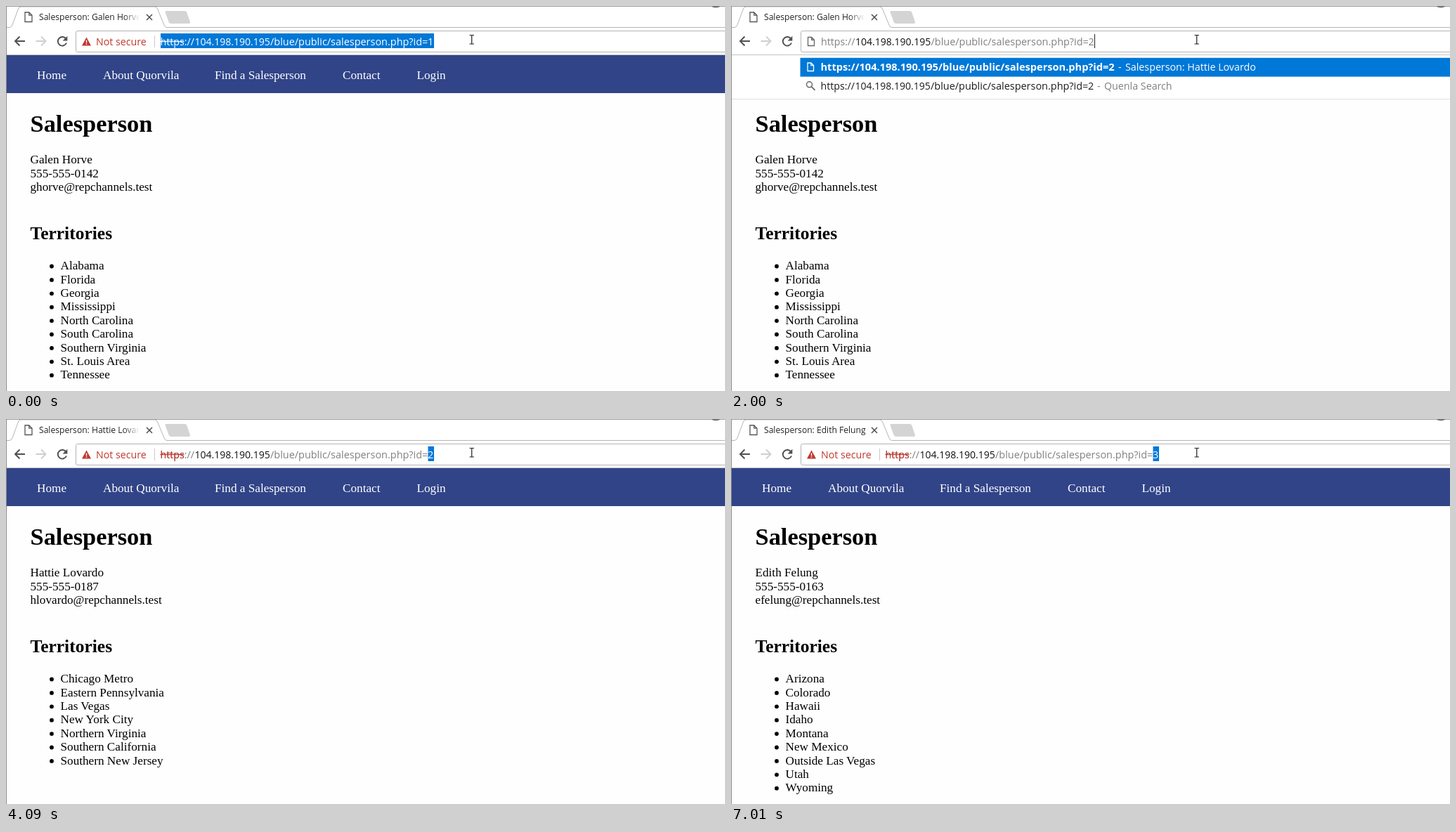
These frames come from a looping animation (1023 by 548 pixels, 8 s). An HTML page:

```html
<!DOCTYPE html>
<html lang="en">
<head>
<meta charset="utf-8">
<title>Salesperson</title>
<style>
html, body { margin: 0; width: 100%; height: 100%; overflow: hidden; background: #fff; }
svg { display: block; width: 1023px; height: 548px; }
.ui { font-family: "Open Sans", "Noto Sans", sans-serif; }
.page { font-family: "Liberation Serif", "Times New Roman", serif; }
</style>
</head>
<body>
<svg id="stage" viewBox="0 0 1023 548" xmlns="http://www.w3.org/2000/svg"></svg>
<script>
const LOOP = 8000;
const BLUE = '#0078d7', LINK = '#2956c8', RED = '#c0372b', GREY = '#808080', INK = '#1c1c1c';

const people = [
  { name: 'Galen Horve', phone: '555-555-0142', mail: 'ghorve', fade: true,
    areas: ['Alabama', 'Florida', 'Georgia', 'Mississippi', 'North Carolina', 'South Carolina',
      'Southern Virginia', 'St. Louis Area', 'Tennessee'] },
  { name: 'Hattie Lovardo', phone: '555-555-0187', mail: 'hlovardo', fade: true,
    areas: ['Chicago Metro', 'Eastern Pennsylvania', 'Las Vegas', 'New York City',
      'Northern Virginia', 'Southern California', 'Southern New Jersey'] },
  { name: 'Edith Felung', phone: '555-555-0163', mail: 'efelung', fade: false,
    areas: ['Arizona', 'Colorado', 'Hawaii', 'Idaho', 'Montana', 'New Mexico',
      'Outside Las Vegas', 'Utah', 'Wyoming'] }
];

// start time and look of the browser from then on
const steps = [
  [0,    { who: 0, id: '1', select: 'all' }],
  [420,  { who: 0, id: '1', caret: true }],
  [1010, { who: 0, id: '1' }],
  [1420, { who: 0, id: '', edit: true, caret: true, drop: 'long' }],
  [1850, { who: 0, id: '2', edit: true, caret: true, drop: 'short' }],
  [2000, { who: 0, id: '2', edit: true, caret: true, drop: 'short', edge: true }],
  [2140, { who: 0, id: '2', edit: true, caret: true }],
  [2260, { who: 0, id: '2', edit: true, caret: true, spin: 200 }],
  [2390, { who: 0, id: '2', edit: true, caret: true, spin: 80 }],
  [2540, { who: 1, id: '2', shift: -6 }],
  [2690, { who: 1, id: '2' }],
  [3970, { who: 1, id: '2', select: 'all' }],
  [4090, { who: 1, id: '2', select: 'digit' }],
  [4990, { who: 1, id: '3', edit: true, caret: true, drop: 'short', edge: true }],
  [5150, { who: 2, id: '3', edit: true }],
  [5300, { who: 2, id: '3' }],
  [7010, { who: 2, id: '3', select: 'digit' }]
];

const HOST = '104.198.190.195', PATH = '/blue/public/salesperson.php?id=';
const title = i => 'Salesperson: ' + people[i].name;

const text = (x, y, s, fill, size, extra = '') =>
  `<text x="${x}" y="${y}" fill="${fill}" font-size="${size}" ${extra}>${s}</text>`;
const rect = (x, y, w, h, fill) =>
  `<rect x="${x}" y="${y}" width="${w}" height="${h}" fill="${fill}"/>`;
const line = (d, color, width = 1) =>
  `<path d="${d}" fill="none" stroke="${color}" stroke-width="${width}"/>`;

function doc(x, y, w, h, color) {
  const f = w * 0.42;
  return line(`M${x} ${y}h${w - f}l${f} ${f}v${h - f}h${-w}z M${x + w - f} ${y}v${f}h${f}`, color, 1.3);
}

function url(x, y, id, side, host, last = side) {
  return text(x, y, 'https://', side, 14.2) +
    text(x + 49, y, HOST, host, 14) +
    text(x + 156.5, y, PATH, side, 14.45) +
    text(x + 380.5, y, id, last, 14.25);
}

function tabs(s) {
  const p = people[s.who];
  const icon = s.spin
    ? `<g transform="rotate(${s.spin} 32 16)">${line('M32 9.5a6.5 6.5 0 1 1-6.5 6.5', '#8a8a8a', 2)}</g>`
    : doc(27, 9, 10, 13.5, '#555');
  return rect(0, 0, 1023, 70, '#fff') +
    line('M0 30.5H5Q8 30 9 27L17.5 4Q18.5 1 21 1H212Q214.5 1 215.5 4L225 27Q226 30.5 229 30.5H1023', '#b5b5b5') +
    '<path d="M228 7h26q2.5 0 3.3 2l4.5 13.5q.7 2.5-1.8 2.5h-25q-2.5 0-3.3-2l-5-13.5q-.7-2.5 1.3-2.5z" fill="#d4d4d4"/>' +
    icon +
    `<g clip-path="url(#tabClip)">${text(47, 20, title(s.who), '#222', 12.1)}</g>` +
    (p.fade ? rect(168, 6, 24, 20, 'url(#fade)') : '') +
    line('M200 12l8 8m0-8l-8 8', '#444', 1.4);
}

function toolbar(s) {
  const arrow = 'm7-6.5l-6.5 6.5l6.5 6.5m-6.5-6.5h14';
  const reload = s.spin
    ? line('M75 45l10 10m0-10l-10 10', '#505050', 2)
    : line('M85.5 47A6.3 6.3 0 1 0 86 52.5', '#505050', 1.9) +
      '<path d="M87.3 42.8v6.7h-6.7z" fill="#505050"/>';
  return line('M12.5 50' + arrow, '#505050', 1.9) +
    `<g transform="translate(70 0) scale(-1 1)">${line('M13 50' + arrow, '#cfcfcf', 1.9)}</g>` +
    reload +
    '<rect x="99.5" y="35.5" width="940" height="30" rx="2" fill="#fff" stroke="#b3b3b3"/>' +
    rect(0, 69, 1023, 1, '#c4c4c4');
}

function address(s) {
  const base = 55.5;
  if (s.edit) {
    const end = s.id ? 517 : 510;
    return doc(109.5, 44.5, 9, 12, '#666') + url(128, base, s.id, GREY, '#111') +
      (s.caret ? rect(end, 40, 1, 20, '#222') : '');
  }
  const dx = s.shift || 0, x = 219.5 + dx, all = s.select === 'all';
  const mark = all ? rect(220, 39, 389, 21, BLUE)
    : s.select === 'digit' ? rect(600.5, 39, 8.5, 21, BLUE) : '';
  const side = all ? '#fff' : GREY;
  return `<path d="M114.5 44.5l6.5 12h-13z" fill="${RED}"/>` +
    rect(113.8, 48.5, 1.4, 4, '#fff') + rect(113.8, 53.5, 1.4, 1.4, '#fff') +
    text(128, base, dx ? 'Not sec…' : 'Not secure', RED, 14.2) +
    rect(211 + dx, 42, 1, 17, '#c8c8c8') + mark +
    url(x, base, s.id, side, all ? '#fff' : '#111', s.select ? '#fff' : side) +
    (all ? '' : text(x, base, 'https', RED, 14.2)) +
    rect(x, 50, 34, 1.2, all ? '#fff' : RED) +
    (s.caret ? rect(609, 39, 1, 21, '#222') : '');
}

function dropdown(s) {
  if (!s.drop) return '';
  const long = s.drop === 'long', bottom = long ? 214 : 132, pitch = 26.8;
  const rowY = i => 92 + i * pitch;
  const bold = (i, id, fill) => text(127.5, rowY(i), 'https://' + HOST + PATH + id, fill, 14.6, 'font-weight="700"');
  const page = (i, fill = '#666') => doc(109, rowY(i) - 11, 8.5, 11.5, fill);
  const tail = (i, x, s, fill = INK, dash = GREY) =>
    text(x, rowY(i), '-', dash, 14.25) + text(x + 10, rowY(i), s, fill, 14.25);
  const search = (i, id) => {
    const y = rowY(i);
    return `<circle cx="111.5" cy="${y - 7}" r="4" fill="none" stroke="#666" stroke-width="1.5"/>` +
      line(`M114.5 ${y - 4}l5 5`, '#666', 1.8) +
      url(127.5, y, id, INK, INK) + tail(i, id ? 521 : 513.5, 'Quenla Search', GREY);
  };
  const visited = (i, id, x, who) => page(i) + bold(i, '', LINK) +
    text(537.5, rowY(i), id, LINK, 14.9) + tail(i, x, title(who));

  let out = rect(1, 70, 1022, bottom - 70, '#fff') +
    (long || s.edge ? rect(1, bottom, 1022, 1, '#dedede') : '') +
    rect(98.5, 73.8, 925, pitch, BLUE) + page(0, '#fff') + bold(0, s.id, '#fff');
  if (long) {
    out += visited(1, '1', 551, 0) + visited(2, '2', 551, 1) + search(3, '') +
      visited(4, '%27 OR SLEEP(5)=0--%27', 716, 0);
  } else {
    if (s.id === '2') out += tail(0, 551, title(1), '#fff', '#fff');
    out += search(1, s.id);
  }
  return out;
}

function page(s) {
  const p = people[s.who], pitch = 19.4;
  const nav = [[44, 'Home'], [138, 'About Quorvila'], [297, 'Find a Salesperson'], [479, 'Contact'], [584.5, 'Login']];
  const body = (x, y, t, fill = '#000') => text(x, y, t, fill, 17.2);
  return rect(0, 70, 1023, 478, '#fefefe') + rect(0, 70, 1023, 54, '#314488') +
    nav.map(([x, t]) => body(x, 104.3, t, '#fff')).join('') +
    text(34.5, 178.5, 'Salesperson', '#000', 34.4, 'font-weight="700"') +
    [p.name, p.phone, p.mail + '@repchannels.test'].map((t, i) => body(34.5, 224.4 + i * pitch, t)).join('') +
    text(34.5, 332, 'Territories', '#000', 25.5, 'font-weight="700"') +
    p.areas.map((t, i) => `<circle cx="65" cy="${370.5 + i * pitch}" r="2.9"/>` +
      body(77.5, 375.2 + i * pitch, t)).join('');
}

const defs = '<defs><clipPath id="tabClip"><rect x="46" y="4" width="146" height="24"/></clipPath>' +
  '<linearGradient id="fade"><stop offset="0" stop-color="#fff" stop-opacity="0"/>' +
  '<stop offset=".92" stop-color="#fff"/></linearGradient></defs>';

const frame = rect(0, 0, 1023, 1, '#9c9c9c') + rect(0, 0, 1, 548, '#8a8a8a') +
  '<ellipse cx="1010" cy="0" rx="6" ry="2.5" fill="#777"/>';
const pointer = line('M659.5 41.5h2.5l.7.7l.7-.7h2.5M662.7 42v11.5M659.5 54h2.5l.7-.7l.7.7h2.5', '#222', 1.2);

const stage = document.getElementById('stage');
let shown = -1;

function draw(now) {
  const t = now % LOOP;
  let i = steps.length - 1;
  while (steps[i][0] > t) i--;
  if (i !== shown) {
    const s = steps[i][1];
    stage.innerHTML = defs + `<g class="page">${page(s)}</g>` +
      `<g class="ui">${tabs(s)}${toolbar(s)}${address(s)}${dropdown(s)}</g>` + frame + pointer;
    shown = i;
  }
}

const start = performance.now();
function tick() {
  draw(performance.now() - start);
  requestAnimationFrame(tick);
}
tick();
</script>
</body>
</html>
```
